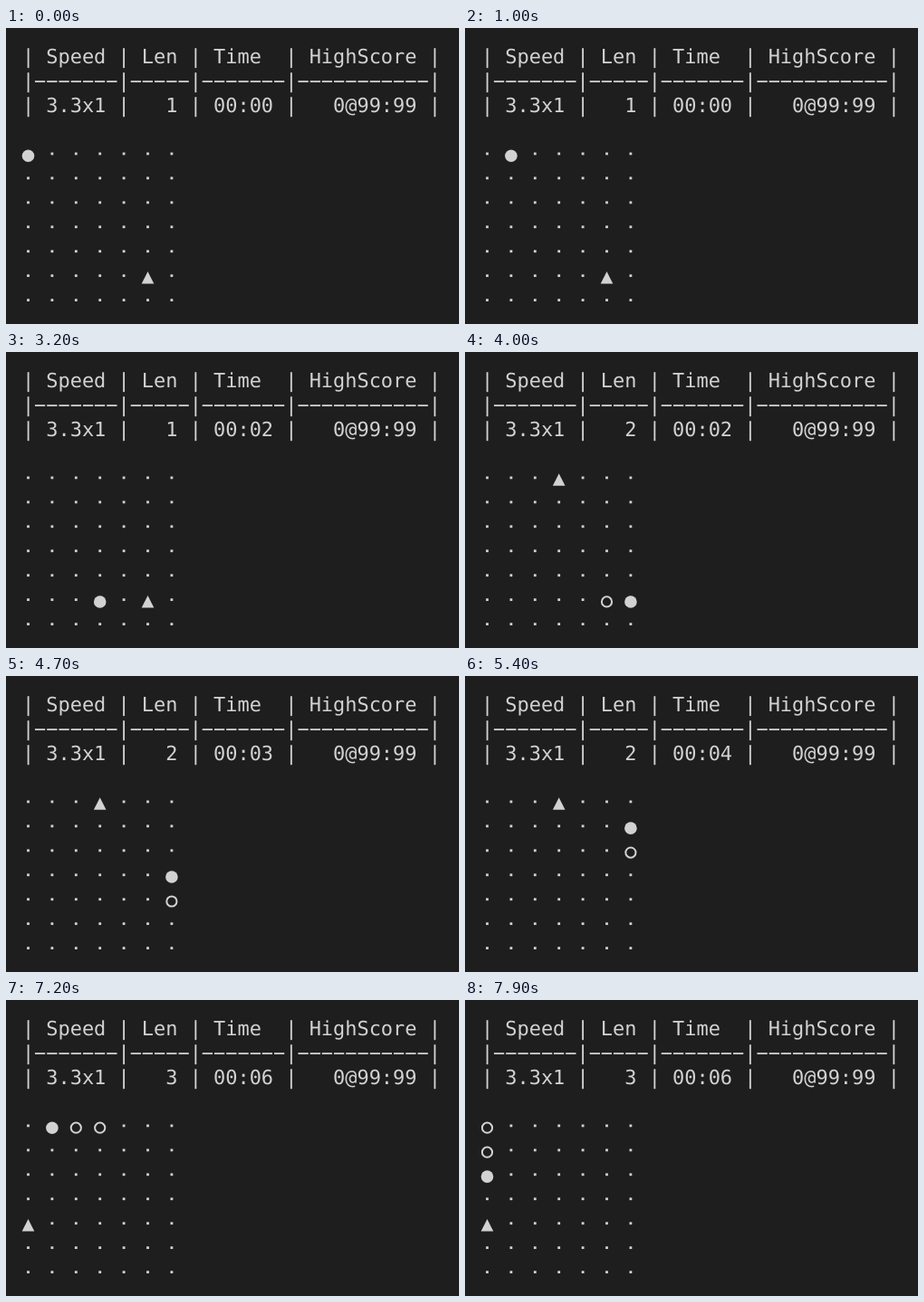
Recreate the animation shown at these times as an HTML page. Size 500 by 327 pixels, loop 8 s.

```html
<!DOCTYPE html>
<html lang="en">
<head>
<meta charset="utf-8">
<title>Terminal snake</title>
<style>
  html, body { margin: 0; width: 100%; height: 100%; overflow: hidden; background: #1e1e1e; }
  svg { display: block; width: 500px; height: 327px; }
  text {
    font: 21.93px "DejaVu Sans Mono", "Liberation Mono", monospace;
    white-space: pre;
    text-rendering: geometricPrecision;
  }
</style>
</head>
<body>
<svg viewBox="0 0 500 327" fill="#d2d2d2">
  <text x="17.9" y="39.3">| Speed | Len | Time  | HighScore |</text>
  <text x="17.9" y="66.3">|−−−−−−−|−−−−−|−−−−−−−|−−−−−−−−−−−|</text>
  <text x="17.9" y="93.3" id="stats"></text>
  <g id="board"></g>
</svg>
<script>
const LOOP = 8000, SIZE = 7, STEP = 300;
const ROUTE = "RRDDDDDRRRRUUUUULLLLLLDD";
const MOVES = { R: [1, 0], L: [-1, 0], U: [0, -1], D: [0, 1] };
const FOODS = [[5, 5], [3, 0], [0, 4]];
const MEALS = [10, 19];
const TICKS = [2000, 3000, 4100, 5100, 6000, 7100];

const stats = document.getElementById("stats");
const board = document.getElementById("board");

const trail = [[0, 0]];
for (const dir of ROUTE) {
  const [x, y] = trail[trail.length - 1];
  const [dx, dy] = MOVES[dir];
  trail.push([x + dx, y + dy]);
}

const shapes = {
  dot: (x, y) => `<rect x="${x - 1.4}" y="${y - 3.7}" width="2.8" height="2.8"/>`,
  head: (x, y) => `<circle cx="${x}" cy="${y}" r="6.8"/>`,
  body: (x, y) => `<circle cx="${x}" cy="${y}" r="5.6" fill="none" stroke="#d2d2d2" stroke-width="2"/>`,
  food: (x, y) => `<path d="M${x} ${y - 7}l6.8 13.6h-13.6z"/>`
};

function stepAt(t) {
  if (t < 1000) return 0;
  if (t < 1400) return 1; // the second move comes slightly late
  return Math.floor((t - 1000) / STEP) + 1;
}

let shown = "";
function draw(t) {
  const step = stepAt(t);
  const seconds = TICKS.filter(tick => t >= tick).length;
  const state = step + ":" + seconds;
  if (state === shown) return;
  shown = state;

  const length = 1 + MEALS.filter(meal => step >= meal).length;
  stats.textContent = `| 3.3x1 |   ${length} | 00:0${seconds} |   0@99:99 |`;

  const cells = { [FOODS[length - 1]]: "food" };
  for (let i = 0; i < length && i <= step; i++) {
    cells[trail[step - i]] = i ? "body" : "head";
  }
  let markup = "";
  for (let row = 0; row < SIZE; row++) {
    for (let col = 0; col < SIZE; col++) {
      markup += shapes[cells[[col, row]] || "dot"](24.5 + 26.4 * col, 141.2 + 26.95 * row);
    }
  }
  board.innerHTML = markup;
}

const start = performance.now();
function frame() {
  draw((performance.now() - start) % LOOP);
  requestAnimationFrame(frame);
}
frame();
</script>
</body>
</html>
```
